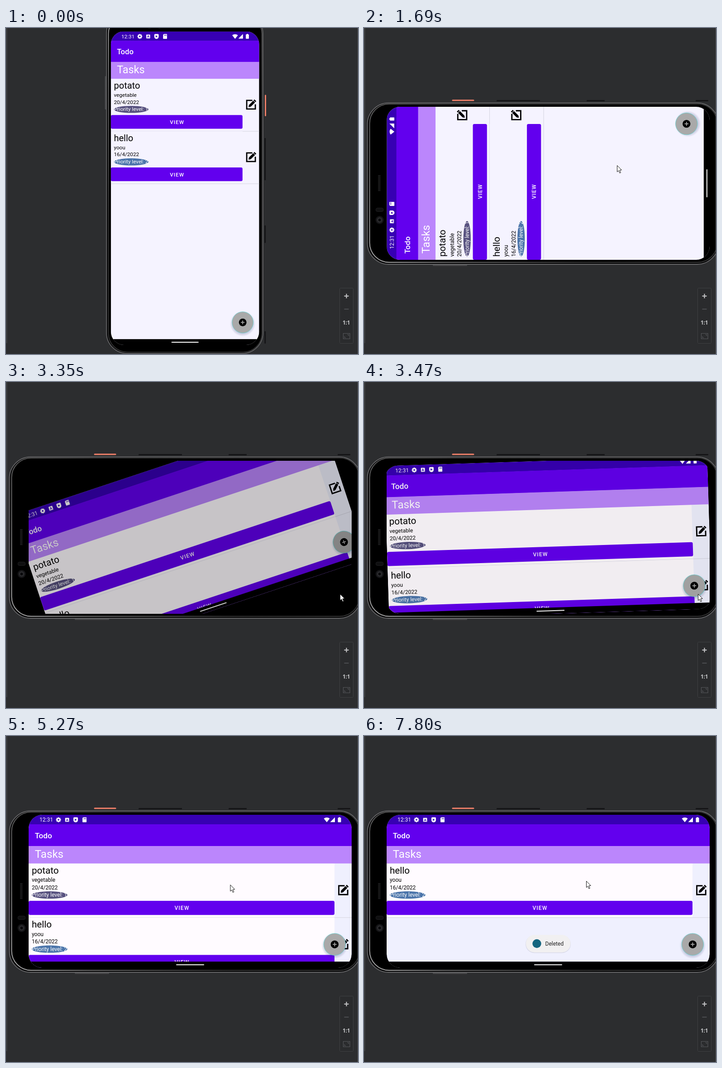
An HTML page with a canvas that plays this animation: 778 px wide and 720 px high, repeating every 8000 ms.

```html
<!DOCTYPE html>
<html lang="en">
<head>
<meta charset="utf-8">
<title>Todo emulator</title>
<style>
html, body { margin: 0; width: 778px; height: 720px; overflow: hidden; background: #2c2d2f; }
canvas { display: block; }
</style>
</head>
<body>
<canvas id="stage" width="778" height="720"></canvas>
<script>
const c = document.getElementById('stage').getContext('2d');
const LOOP = 8000, FIRST = 490, STEP = 135.2;
const LANDSCAPE = 3320, DRAG = 5900, FLUNG = 6574, REMOVED = 6800;
const PURPLE = '#6200ee';

// pointer stops: time, x, y
const stops = [[1030, 433, 187], [2340, 738, 468], [3470, 738, 468], [3900, 732, 514],
  [4300, 752, 419], [5367, 455, 314], [DRAG, 455, 314], [FLUNG, 461, 182],
  [REMOVED, 461, 182], [7790, 491, 320]];

const snap = t => t < 500 ? 0 : FIRST + Math.floor((t - FIRST) / STEP) * STEP;
const part = (t, a, b) => Math.min(1, Math.max(0, (t - a) / (b - a)));

function pointer(t) {
  let i = 1;
  while (i < stops.length - 1 && t > stops[i][0]) i++;
  const [t0, x0, y0] = stops[i - 1], [t1, x1, y1] = stops[i];
  const k = part(t, t0, t1);
  const swing = 150 * Math.sin(Math.PI * part(t, DRAG, FLUNG));
  return [x0 + (x1 - x0) * k + swing, y0 + (y1 - y0) * k];
}

function rect(x, y, w, h, fill) { c.fillStyle = fill; c.fillRect(x, y, w, h); }

function paint(fill, stroke, lw = 1) {
  if (fill) { c.fillStyle = fill; c.fill(); }
  if (stroke) { c.strokeStyle = stroke; c.lineWidth = lw; c.stroke(); }
}

function round(x, y, w, h, r, fill, stroke, lw) {
  c.beginPath();
  c.roundRect(x, y, w, h, r);
  paint(fill, stroke, lw);
}

function disc(x, y, r, fill, ry = r) {
  c.beginPath();
  c.ellipse(x, y, r, ry, 0, 0, 7);
  paint(fill);
}

function poly(points, fill, stroke, lw, open) {
  c.beginPath();
  points.forEach(p => c.lineTo(...p));
  if (!open) c.closePath();
  paint(fill, stroke, lw);
}

function triangle(x, y, r, fill) {
  const corner = i => [x + r * Math.cos(i * Math.PI / 1.5), y + r * Math.sin(i * Math.PI / 1.5)];
  poly([0, 1, 2].map(corner), fill);
}

function text(s, x, y, size, fill, weight = 400, gap = 0, font = 'Roboto') {
  c.font = `${weight} ${size}px ${font}, sans-serif`;
  c.letterSpacing = gap + 'px';
  c.fillStyle = fill;
  c.fillText(s, x, y);
  c.letterSpacing = '0px';
}

function at(x, y, draw, turn = 0) {
  c.save();
  c.translate(x, y);
  c.rotate(turn);
  draw();
  c.restore();
}

function statusBar(w) {
  const dark = '#3700b3', ink = '#fff';
  rect(0, 0, w, 21.5, dark);
  text('12:31', 24, 15.3, 12.05, ink);
  at(66, 11, () => {
    for (let i = 0; i < 8; i++) {
      c.rotate(Math.PI / 4);
      rect(-1.3, -5.5, 2.6, 3, ink);
    }
    disc(0, 0, 4.2, ink);
    disc(0, 0, 1.8, dark);
  });
  round(80.7, 6.7, 8.8, 8.8, 1, ink);
  text('A', 82.4, 14, 8, dark, 700);
  round(99, 5.6, 10, 11.2, [2, 2, 5, 5], ink);
  triangle(103.6, 11, 2.9, dark);
  round(119, 5.5, 9, 11, [3, 1, 1, 1], ink);
  for (let i = 0; i < 3; i++) rect(121.8 + i * 2, 7.2, 1, 2.6, dark);
  c.beginPath();
  c.moveTo(w - 55, 16.5);
  c.arc(w - 55, 16.5, 10.5, -2.24, -0.9);
  paint(ink);
  poly([[w - 47.5, 16.2], [w - 37, 16.2], [w - 37, 5.6]], ink);
  round(w - 30.5, 6.6, 7, 9.8, 1, ink);
  rect(w - 28.6, 5.3, 3.2, 2, ink);
}

function editIcon(x, y) {
  at(x, y, () => {
    const e = 9.8;
    poly([[3, -e], [-e, -e], [-e, e], [e, e], [e, -1]], null, '#000', 2.9, true);
    c.rotate(Math.PI / 4);
    rect(-2.9, -14, 5.8, 3, '#000');
    rect(-2.9, -10, 5.8, 14, '#000');
    poly([[-2.9, 4], [2.9, 4], [0, 8]], '#000');
  });
}

function row(w, y, task, card, dx) {
  at(dx, y, () => {
    rect(0, 0, w - 38, 119, card);
    text(task.name, 6.9, 22.3, 20.66, '#000');
    text(task.note, 6.9, 40.7, 12.05, '#000');
    text(task.date, 6.9, 57.1, 12.05, '#000');
    disc(46.3, 69.7, 39.4, task.color, 8.1);
    text('Priority level: ' + task.level, 6.9, 73.5, 12.05, '#fff');
    round(0, 82.5, w - 38, 31.2, 3.4, PURPLE);
    text('VIEW', (w - 38) / 2 - 15.6, 102.6, 12.05, '#fff', 500, 1.08);
    editIcon(w - 18.6, 59);
  });
}

function fab(x, y) {
  at(x, y, () => {
    const g = c.createRadialGradient(0, 3, 21, 0, 3, 29);
    g.addColorStop(0, 'rgba(40,50,110,.26)');
    g.addColorStop(1, 'rgba(40,50,110,0)');
    disc(0, 3, 29, g);
    disc(0, 0, 24.2, '#a9a9a9');
    paint(null, 'rgba(80,215,210,.7)');
    disc(0, 0, 8.7, '#000');
    rect(-4.3, -0.9, 8.6, 1.8, '#a9a9a9');
    rect(-0.9, -4.3, 1.8, 8.6, '#a9a9a9');
  });
}

const potato = { name: 'potato', note: 'vegetable', date: '20/4/2022', level: 1, color: '#57517f' };
const hello = { name: 'hello', note: 'yoou', date: '16/4/2022', level: 2, color: '#4a74aa' };

function app(w, h, t) {
  const wide = w > h;
  const top = 107.5, pitch = 119.5;
  const flung = 687 * Math.max(0, (t - DRAG) / (FLUNG - DRAG)) ** 2;
  rect(0, 0, w, h, wide ? '#eff0fe' : '#f5f3ff');
  const tasks = t < REMOVED ? [potato, hello] : [hello];
  tasks.forEach((task, i) => {
    const y = top + i * pitch;
    row(w, y, task, wide ? '#fffbff' : '#f5f3ff', task === potato ? flung : 0);
    rect(0, y + pitch - 0.5, w, 1, '#d3d3de');
  });
  statusBar(w);
  rect(0, 21, w, 48.5, PURPLE);
  text('Todo', 13.8, 51.7, 17.2, '#fff', 500);
  rect(0, 69, w, 38.5, '#bb86fc');
  text('Tasks', 13.8, 94.6, 24.1, '#fff');
  fab(w - 37.6, h - 51.8);
  if (t >= REMOVED) toast(w / 2, h - 53.5, t < REMOVED + STEP ? 0.6 : 1);
  rect(0, h - 13.7, w, 14, '#000');
  round(w / 2 - 31, h - 7.7, 62, 2, 1, '#fff');
}

function toast(x, y, alpha) {
  c.save();
  c.globalAlpha = alpha;
  round(x - 50, y - 18.6, 100, 39.4, 19.7, 'rgba(60,60,90,.13)');
  round(x - 49.3, y - 19.3, 98.8, 38.8, 19.4, '#f1f0f1');
  disc(x - 25, y, 9.7, '#14657f');
  text('Deleted', x - 6.5, y + 4.3, 12.05, '#222');
  c.restore();
}

function rotateButton(t) {
  disc(729.8, 477, 17.4, '#3d3d40');
  at(730, 477, () => {
    for (let i = 0; i < 2; i++) {
      poly([[-3.8, 2], [-3.8, -4.5], [2, -4.5]], null, '#fff', 1.4, true);
      triangle(2.8, -4.5, 2.6, '#fff');
      c.rotate(Math.PI);
    }
  }, t < 2600 ? -Math.PI / 4 : 0);
}

// the body is laid out lying on its side
function phone() {
  round(194.5, 158.2, 49, 3, 1.5, '#f07f68');
  for (const [x, w] of [[293, 96], [492, 40], [733, 28]]) round(x, 159, w, 3, 1, '#151517');
  round(152, 522, 76, 3.6, 1.5, '#4b4b4d');
  round(7.5, 165.5, 776, 356.5, 47, '#09090a', '#666668', 1.8);
  const g = c.createLinearGradient(20, 520, 330, 300);
  g.addColorStop(0, '#b8b8b8');
  g.addColorStop(0.35, '#707070');
  g.addColorStop(1, '#333');
  round(12.5, 167.8, 768, 349.7, 43, '#000', g, 1.8);
  for (let y = 325; y < 360; y += 3) rect(31, y, 5.5, 2, '#1f1f20');
  round(26, 397.5, 17, 8, 4, '#101011', '#1d1d1f');
  ['#151517', '#2a2a2d', '#08080a'].forEach((fill, i) => disc(34.5, 424, 9 - i * 3, fill));
}

function clipScreen(x, y) {
  c.beginPath();
  c.roundRect(x, y, 714, 338, 30);
  c.clip();
}

function screen(t) {
  c.save();
  clipScreen(50, 174);
  if (t < LANDSCAPE) {
    at(50.6, 512, () => app(338, 714, t), -Math.PI / 2);
    if (t >= 2080) rotateButton(t);
  } else {
    const left = t < 3590 ? 10 ** ((3464 - t) / STEP) : 0;
    at(407, 343, () => {
      clipScreen(-357, -169);
      c.translate(-357, -169);
      app(714, 338, t);
      rect(0, 0, 714, 338, `rgba(0,0,0,${0.055 * left ** 0.6})`);
    }, -1.85 * left * Math.PI / 180);
  }
  c.restore();
}

function toolbox() {
  const on = '#c9cacc', off = '#55575a';
  round(737.5, 574.5, 30, 122, 2, '#2a2b2d', '#3f4143');
  rect(747.5, 591, 10, 2, on);
  rect(751.5, 587, 2, 10, on);
  rect(747.5, 620, 10, 1.6, off);
  c.textAlign = 'center';
  text('1:1', 752.2, 655, 11.5, on, 700, 0, 'Open Sans');
  c.textAlign = 'left';
  at(752.7, 680.5, () => {
    round(-7.2, -6, 14.5, 12, 0, null, off, 1.2);
    for (let i = 0; i < 2; i++) {
      poly([[-4.5, 0.5], [-4.5, 3.5], [-1.5, 3.5]], null, off, 1.2, true);
      c.rotate(Math.PI);
    }
  });
}

function cursor(t) {
  at(...pointer(t), () => poly([[0.5, 0.5], [0.5, 14.6], [3.7, 11.7], [6, 17.2], [8.3, 16.2],
    [6, 10.8], [10.3, 10.5]], '#fff', '#111'));
}

function draw(now) {
  const t = snap(now % LOOP);
  rect(0, 0, 778, 720, '#2c2d2f');
  rect(0, 0, 3, 696, '#393b3d');
  c.save();
  if (t < FIRST) c.transform(0, 0.97, -0.97, 0, 728.4, -41.2);
  phone();
  screen(t);
  c.restore();
  rect(777, 0, 1, 720, '#505254');
  toolbox();
  if (t >= stops[0][0]) cursor(t);
}

const start = performance.now();
function loop() {
  draw(performance.now() - start);
  requestAnimationFrame(loop);
}
loop();
</script>
</body>
</html>
```
